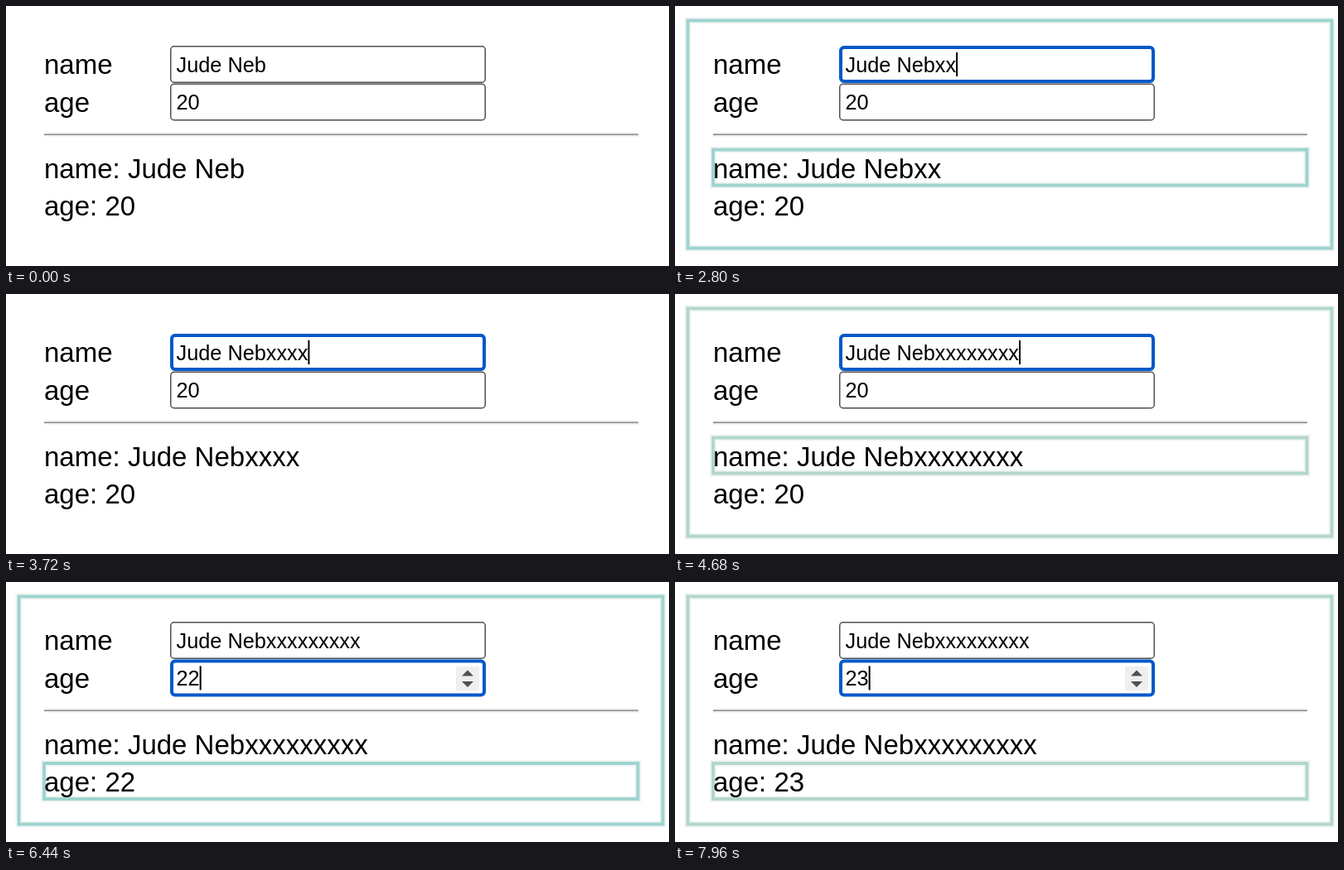
Animation of 800 by 314 pixels, one loop 8000 ms. Source, as an HTML page:

```html
<!DOCTYPE html>
<html lang="en">
<head>
<meta charset="utf-8">
<title>Form state</title>
<style>
  html, body { margin: 0; width: 100%; height: 100%; overflow: hidden; background: #fff; }
  svg { display: block; width: 100%; height: 100%; }
  text { font: 33px "Liberation Sans", Arial, sans-serif; fill: #000; }
  .typed { font-size: 25.3px; }
  .field { fill: #fff; }
  .glow { fill: none; stroke-width: 4; }
  .halo { fill: none; stroke: #f1f5f4; stroke-width: 8; }
</style>
</head>
<body>
<svg viewBox="0 0 800 314">
  <text x="46" y="82">name</text>
  <text x="46" y="128">age</text>
  <rect id="nameBox" class="field"/>
  <rect id="ageBox" class="field"/>
  <rect id="selection" x="205.5" y="102" width="28.5" height="29" fill="#b3d7fe"/>
  <text id="nameIn" class="typed" x="205.5" y="79.5"></text>
  <text id="ageIn" class="typed" x="205.5" y="125"></text>
  <rect id="caret" width="2" height="29"/>
  <g id="spinner">
    <rect x="543" y="102" width="28" height="29" fill="#efefef"/>
    <path d="M550 113.5l7-7 7 7zM550 120l7 7 7-7z" fill="#505050"/>
  </g>
  <path d="M46 155.2H763" stroke="#949494" stroke-width="2"/>
  <path d="M46 157H763" stroke="#ececec" stroke-width="1.6"/>
  <g id="glow">
    <rect class="halo" x="15.5" y="17.5" width="777" height="275"/>
    <rect class="halo row" x="46" y="173.5" width="716.5" height="43"/>
    <rect class="glow" x="15.5" y="17.5" width="777" height="275"/>
    <rect class="glow row" x="46" y="173.5" width="716.5" height="43"/>
  </g>
  <text id="nameOut" x="46" y="207.5"></text>
  <text id="ageOut" x="46" y="253"></text>
  <path id="arrow" d="M0 0V25l6-5.500 4.500 10 4.500-2-4.500-10h8z"
        stroke="#fff" stroke-width="2" paint-order="stroke"/>
  <g id="beam" fill="none">
    <path id="beamPath" d="M-6.500-14Q0-14 0-9Q0-14 6.500-14M0-9V10M-6.500 15Q0 15 0 10Q0 15 6.500 15M-3.500 5H3.500"
          stroke="#fff" stroke-width="5"/>
    <use href="#beamPath" style="stroke:#000"/>
  </g>
</svg>
<script>
const $ = id => document.getElementById(id);
const LOOP = 8000, FOCUS = 1680, TAB = 5600;
const TEAL = '#9fd4cf', GREEN = '#b2d7cb', SAGE = '#bfd9c9';

const keys = [2520, 2800, 3080, 3440, 3760, 4040, 4440, 4680, 4860];
const ages = [[5920, 21], [6440, 22], [6880, 23], [7400, 24], [7720, 23]];
// start, end, colour of the render outlines
const glows = [
  [2520, 2760, TEAL], [2800, 3040, TEAL], [3080, 3320, TEAL], [3440, 3720, TEAL],
  [3760, 4000, TEAL], [4040, 4280, TEAL], [4680, 4860, GREEN], [4860, 5160, SAGE],
  [5920, 6200, TEAL], [6440, 6720, TEAL], [6880, 7120, TEAL],
  [7400, 7720, TEAL], [7720, LOOP, GREEN]
];
// time, x, y of the pointer
const path = [[640, 346, 300], [680, 393, 240], [720, 437, 200], [920, 437, 200], [1400, 390, 81]];

const set = (el, attrs) => { for (const k in attrs) el.setAttribute(k, attrs[k]); };
const show = (id, on) => { $(id).style.display = on ? '' : 'none'; };

function drawField(id, y, focused) {
  const w = focused ? 4 : 1.5;
  set($(id), {
    x: 198 + w / 2, y: y + w / 2, width: 381 - w, height: 45 - w,
    rx: 4, stroke: focused ? '#0459c9' : '#505050', 'stroke-width': w
  });
}

function pointer(t) {
  const i = path.findIndex(p => p[0] > t);
  if (i < 0) return path[path.length - 1].slice(1);
  const [t0, x0, y0] = path[Math.max(0, i - 1)], [t1, x1, y1] = path[i];
  const u = Math.max(0, (t - t0) / (t1 - t0 || 1)), e = u * u * (3 - 2 * u);
  return [x0 + (x1 - x0) * e, y0 + (y1 - y0) * e];
}

function draw(t) {
  const name = 'Jude Neb' + 'x'.repeat(keys.filter(k => k <= t).length);
  const age = ages.reduce((v, [at, n]) => at <= t ? n : v, 20);
  const onName = t >= FOCUS && t < TAB, onAge = t >= TAB;
  $('nameIn').textContent = name;
  $('nameOut').textContent = 'name: ' + name;
  $('ageIn').textContent = age;
  $('ageOut').textContent = 'age: ' + age;

  drawField('nameBox', 48, onName);
  drawField('ageBox', 93.5, onAge);
  show('spinner', onAge);
  show('selection', onAge && t < ages[0][0]);

  // the caret blinks from the latest edit
  const edits = [FOCUS, ...keys, ...ages.map(a => a[0])];
  const last = Math.max(...edits.filter(k => k <= t));
  const active = $(onAge ? 'ageIn' : 'nameIn');
  show('caret', (onName || t >= ages[0][0]) && (t - last) % 1000 < 500);
  set($('caret'), { x: 205.5 + active.getComputedTextLength(), y: onAge ? 101.5 : 56 });

  const glow = glows.find(([a, b]) => a <= t && t < b);
  show('glow', glow);
  if (glow) {
    for (const r of document.querySelectorAll('.glow')) set(r, { stroke: glow[2] });
    for (const r of document.querySelectorAll('.row')) set(r, { y: onAge ? 219 : 173.5 });
  }

  const [x, y] = pointer(t), visible = t >= 640 && t < keys[0], overField = y < 138;
  show('arrow', visible && !overField);
  show('beam', visible && overField);
  for (const id of ['arrow', 'beam']) set($(id), { transform: `translate(${x} ${y})` });
}

// a black core over the white edge of the text pointer
const core = $('beamPath').cloneNode();
core.removeAttribute('id');
set(core, { stroke: '#000', 'stroke-width': 2.2 });
document.querySelector('#beam use').replaceWith(core);

const start = performance.now();
(function tick() {
  draw((performance.now() - start) % LOOP);
  requestAnimationFrame(tick);
})();
</script>
</body>
</html>
```
